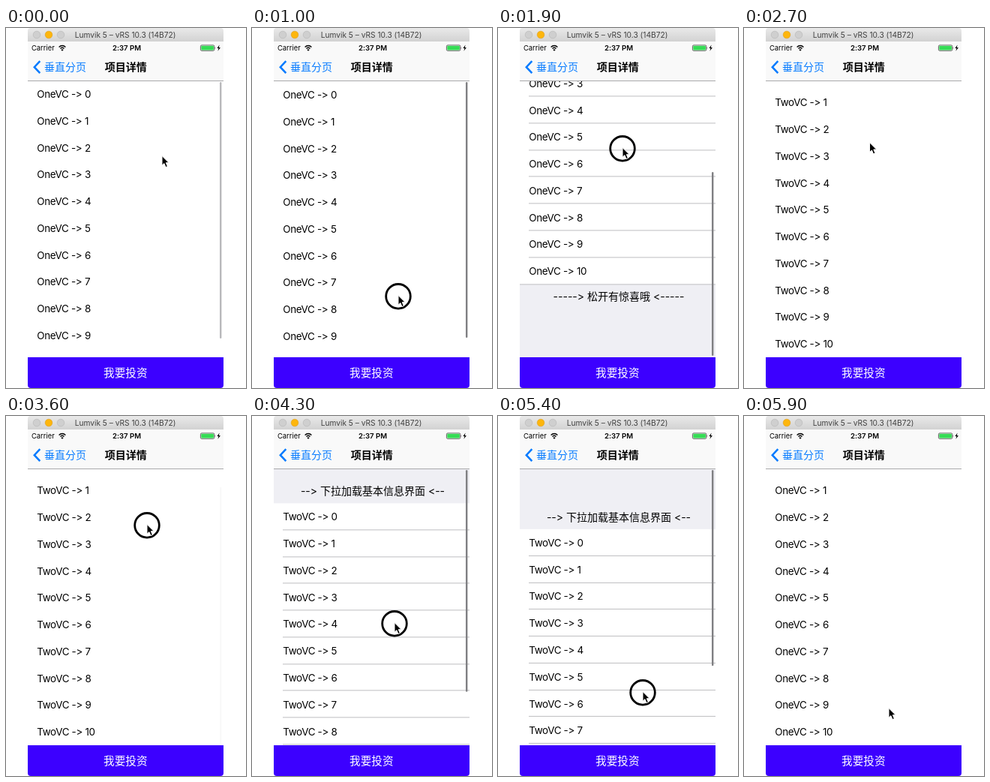
Recreate the animation shown at these times as an HTML page. Size 320 by 480 pixels, loop 6 s.

```html
<!DOCTYPE html>
<html lang="zh">
<head>
<meta charset="utf-8">
<title>垂直分页</title>
<style>
html, body { margin: 0; width: 100%; height: 100%; overflow: hidden; background: #fff; }
#stage { display: block; width: 100vw; height: 100vh; }
text { font-family: Inter, "Noto Sans CJK SC", "Noto Sans CJK", sans-serif; font-variant-ligatures: none; font-feature-settings: "calt" 0; }
.row { font-size: 13.4px; letter-spacing: -.3px; }
.hint { font-size: 14px; text-anchor: middle; }
.mid { text-anchor: middle; }
</style>
</head>
<body>
<svg id="stage" viewBox="0 0 320 480">
  <defs>
    <linearGradient id="bar" x2="0" y2="1"><stop stop-color="#e9e9e9"/><stop offset="1" stop-color="#d2d2d2"/></linearGradient>
  </defs>
  <svg id="view" x="29" y="70" width="261" height="369"></svg>

  <path d="M29 18V4a4 4 0 0 1 4-4H286a4 4 0 0 1 4 4V18Z" fill="url(#bar)"/>
  <g stroke-width=".6">
    <circle cx="41" cy="9" r="4.8" fill="#cfcfcf" stroke="#b5b5b5"/>
    <circle cx="57" cy="9" r="4.8" fill="#fdb60d" stroke="#dd9d1c"/>
    <circle cx="73" cy="9" r="4.8" fill="#cfcfcf" stroke="#b5b5b5"/>
  </g>
  <text class="mid" x="159" y="13" font-size="10.2" fill="#404040">Lumvik 5 – vRS 10.3 (14B72)</text>

  <path d="M29 18H290V70H29Z" fill="#f9f9f9"/>
  <path d="M29 70.5H290" stroke="#a9a9ab"/>
  <text x="34" y="30" font-size="9.4">Carrier</text>
  <g fill="none" stroke="#000" stroke-width="1.4">
    <path d="M70.6 25.4a6.2 6.2 0 0 1 8.8 0M72.5 27.5a3.6 3.6 0 0 1 5 0"/>
  </g>
  <path d="M75 30.8l-1.7-1.8a2.4 2.4 0 0 1 3.4 0Z"/>
  <text class="mid" x="161" y="30" font-size="9.6" font-weight="600">2:37 PM</text>
  <rect x="259.4" y="22.9" width="18.4" height="7.4" rx="1.6" fill="#fff" stroke="#222" stroke-width=".7"/>
  <rect x="260.3" y="23.8" width="16.6" height="5.6" rx=".8" fill="#35dc55"/>
  <path d="M278.6 25.2q1.2 1.4 0 2.8Z"/>
  <path d="M284.6 22.5l-3.2 4.4h2l-1 3.8 3.5-4.7h-2.1Z"/>
  <path d="M45.3 44.2L37.8 52.2l7.5 8" fill="none" stroke="#007aff" stroke-width="2.5"/>
  <text x="51" y="57.2" font-size="14" fill="#0a7dff">垂直分页</text>
  <text class="mid" x="159.7" y="57.2" font-size="14" font-weight="700">项目详情</text>

  <path d="M29 439H290V476a4 4 0 0 1-4 4H33a4 4 0 0 1-4-4Z" fill="#3c00ff"/>
  <text class="mid" x="159.3" y="465.2" font-size="14.6" font-weight="300" fill="#fff">我要投资</text>

  <g id="pointer">
    <circle id="ring" r="16.3" cy=".8" fill="none" stroke="#000" stroke-width="2.8"/>
    <path d="M0-.5V12.3L2.9 9.6 5 14.6 7.4 13.5 5.3 8.7H9.2Z" fill="#000" stroke="#fff" stroke-width="1"/>
  </g>
</svg>
<script>
const LOOP = 6000, STEP = 100;
const H = 369, ROW = 35.78, COUNT = 11, LIST = ROW * COUNT, MAX = LIST - H;
const $ = id => document.getElementById(id);

function add(parent, tag, attrs, text) {
  const el = document.createElementNS("http://www.w3.org/2000/svg", tag);
  for (const k in attrs) el.setAttribute(k, attrs[k]);
  if (text) el.textContent = text;
  parent.append(el);
  return el;
}

function makePage(name, hint, hintY) {
  const box = add($("view"), "svg", { width: 261, height: H });
  add(box, "rect", { width: 261, height: H + 40, fill: "#efeff4" });
  const list = add(box, "g", {});
  add(list, "rect", { width: 261, height: LIST, fill: "#fff" });
  const lines = add(list, "g", { stroke: "#bdbdc0" });
  for (let i = 0; i < COUNT; i++) {
    add(list, "text", { class: "row", x: 12.2, y: 23 + i * ROW }, `${name} -> ${i}`);
    const x = i < COUNT - 1 ? 12 : 0, y = Math.round((i + 1) * ROW) - .5;
    add(lines, "path", { d: `M${x} ${y}H261` });
  }
  add(list, "text", { class: "hint", x: 132, y: hintY }, hint);
  const thumb = add(box, "rect", { x: 256, width: 2.4, rx: 1.2, fill: "#808083" });
  return { box, list, lines, thumb };
}

const one = makePage("OneVC", "-----> 松开有惊喜哦 <-----", LIST + 21);
const two = makePage("TwoVC", "--> 下拉加载基本信息界面 <--", -11);

const clamp = (v, a = 0, b = 1) => Math.min(b, Math.max(a, v));
const ease = p => p * p * (3 - 2 * p);
const span = (t, a, b) => clamp((t - a) / (b - a));

// Pointer path: time, x, y
const path = [
  [0, 208, 171], [100, 208, 171], [800, 195, 357], [1000, 195, 357],
  [1900, 166, 160], [2100, 165, 155], [2900, 168, 153], [3400, 188, 145],
  [3600, 188, 145], [4300, 190, 276], [5400, 193, 368], [5700, 193, 390], [6000, 193, 390]
];

function pointerAt(t) {
  const i = path.findIndex((p, n) => n && t <= p[0]);
  const [a, x, y] = path[i - 1], [b, u, v] = path[i];
  const p = ease(span(t, a, b));
  return { x: x + (u - x) * p, y: y + (v - y) * p };
}

function scrollOne(t, y) {
  if (t < 1000) return 0;
  if (t >= 2800) return MAX;
  const drag = 357 - y - 1;
  const pos = drag < MAX ? drag : MAX + (drag - MAX) * .566;
  return pos + (MAX - pos) * ease(span(t, 2200, 2700));
}

function scrollTwo(t, y) {
  if (t < 3600) return MAX;
  const pull = Math.max(0, y - 155) - MAX;
  return pull < 0 ? -pull : -H * (1 - 1 / (pull * .55 / H + 1));
}

function place(page, top, scroll, thumb) {
  const over = Math.max(0, -scroll, scroll - MAX);
  page.box.setAttribute("y", top);
  page.list.setAttribute("transform", `translate(0 ${-scroll})`);
  page.lines.style.display = over > 2 ? "" : "none";
  page.thumb.setAttribute("y", scroll > MAX ? 367 - 342 + over : 2 + clamp(scroll, 0, MAX) * .93);
  page.thumb.setAttribute("height", Math.max(8, 342 - over));
  page.thumb.style.opacity = thumb;
}

function draw(t) {
  const p = pointerAt(t), back = t > 5400;
  const slide = ease(span(t, 2200, 2700)) - ease(span(t, 5400, 5850));
  const held = pointerAt(Math.min(t, 5400));
  const fade = t < 1000 ? .55 * (1 - span(t, 0, 200)) : 1 - span(t, 2200, 2600);

  place(one, -slide * H, scrollOne(t, p.y), fade);
  place(two, (1 - slide) * H, scrollTwo(t, held.y), span(t, 3590, 3800) * (1 - span(t, 5400, 5800)));
  one.box.setAttribute("height", back ? H + 32 : H);
  one.box.style.display = slide < 1 ? "" : "none";
  two.box.style.display = slide > 0 ? "" : "none";
  $("view").append(back ? one.box : two.box);

  $("pointer").setAttribute("transform", `translate(${p.x} ${p.y})`);
  const down = (t >= 900 && t < 2200) || (t >= 3500 && t < 5500);
  $("ring").style.display = down ? "" : "none";
}

function tick() {
  const t = performance.now() % LOOP;
  draw(Math.floor(t / STEP) * STEP);
  requestAnimationFrame(tick);
}
tick();
</script>
</body>
</html>
```
